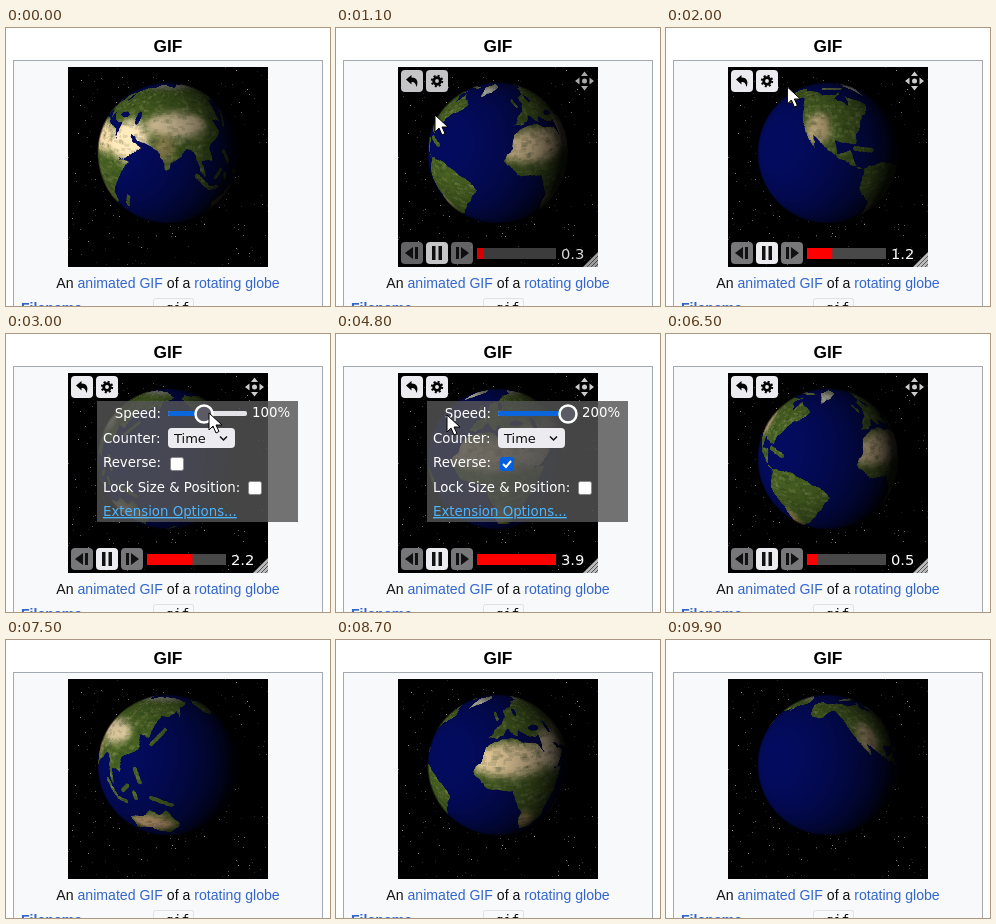
An HTML page with a canvas that plays this animation: 324 px wide and 278 px high, repeating every 10000 ms.

```html
<!DOCTYPE html>
<html lang="en">
<head>
<meta charset="utf-8">
<title>Rotating globe</title>
<style>
html, body { margin: 0; width: 324px; height: 278px; overflow: hidden; background: #fff; }
body { position: relative; }
#box { position: absolute; left: 7px; top: 32px; width: 308px; height: 260px; border: 1px solid #a2a9b1; background: #f8f9fa; }
canvas { position: absolute; left: 62px; top: 39px; }
svg { position: absolute; left: 0; top: 0; }
.page { font: 14.1px "Liberation Sans", Arial, sans-serif; }
.ui { font: 13.33px "DejaVu Sans", Verdana, sans-serif; fill: #fff; }
.link { fill: #36c; }
</style>
</head>
<body>
<div id="box"></div>
<canvas id="globe" width="200" height="200"></canvas>
<svg width="324" height="278">
  <g class="page">
    <text x="162" y="23.500" text-anchor="middle" font-size="17.3" font-weight="bold">GIF</text>
    <text x="162" y="260" text-anchor="middle" fill="#111">An <tspan class="link">animated GIF</tspan> of a <tspan class="link">rotating globe</tspan></text>
    <text x="15" y="285" font-weight="bold" class="link">Filename</text>
    <rect x="147.500" y="270.500" width="40" height="20" rx="2" fill="#f8f9fa" stroke="#dfe1e5"/>
    <text x="152" y="284" font-size="13" font-family="DejaVu Sans Mono, monospace">.gif</text>
  </g>
  <g id="controls">
    <g fill="#ececf0">
      <rect x="65" y="42" width="22" height="22" rx="4"/>
      <rect x="90" y="42" width="22" height="22" rx="4"/>
      <rect x="90" y="214" width="22" height="22" rx="4"/>
    </g>
    <g fill="#77777a">
      <rect x="65" y="214" width="22" height="22" rx="4"/>
      <rect x="115" y="214" width="22" height="22" rx="4"/>
    </g>
    <path d="M70 51.500l5.500-4.500v2.500c6 0 7 5 5 9.500c-1-4-2-5-5-5v2.500z"/>
    <g fill="none" stroke="#000">
      <circle cx="101" cy="53" r="3.300" stroke-width="2.800"/>
      <circle cx="101" cy="53" r="5.200" stroke-width="2" stroke-dasharray="2.040"/>
    </g>
    <path d="M69 225l8-6v12zM79 219h3v12h-3zM96 218h3.500v14H96zM102.500 218h3.500v14h-3.500zM120 219h3v12h-3zM133 225l-8-6v12z" fill="#111"/>
    <rect x="141" y="220" width="79" height="11" fill="#484848"/>
    <rect id="bar" x="141" y="220" height="11" fill="#f00"/>
    <text id="count" class="ui" x="225" y="231" style="font-size:14.7px"></text>
    <path d="M248.500 43.500l3.500 4.500h-7zM248.500 62.500l3.500-4.500h-7zM239 53l4.500-3.500v7zM258 53l-4.500-3.500v7z" fill="#ccc"/>
    <circle cx="248.500" cy="53" r="2.500" fill="#ccc"/>
    <path d="M262 224v15h-15z" fill="#bbb"/>
    <path d="M251 239l11-11M255 239l7-7M259 239l3-3" stroke="#555"/>
  </g>
  <g id="panel" class="ui">
    <rect x="91" y="67" width="201" height="121" fill="#555" fill-opacity=".82"/>
    <text x="155" y="84" text-anchor="end">Speed:</text>
    <text x="97" y="109">Counter:</text>
    <text x="97" y="133">Reverse:</text>
    <text x="97" y="158">Lock Size &amp; Position:</text>
    <text x="97" y="182" fill="#4db5ff" text-decoration="underline">Extension Options...</text>
    <rect x="162" y="77" width="79" height="5" rx="2" fill="#e4e4e8"/>
    <rect id="fill" x="162" y="77" height="5" rx="2" fill="#0b66dc"/>
    <circle id="thumb" cy="80" r="8.500" fill="#5b5b66" stroke="#fff" stroke-width="2.500"/>
    <text id="percent" x="246" y="83"></text>
    <rect x="162" y="94" width="67" height="20" rx="4" fill="#ececf0"/>
    <text x="168" y="109" fill="#111" style="font-size:13px">Time</text>
    <path d="M214 102.500l3.500 3.500l3.500-3.500" fill="none" stroke="#111" stroke-width="1.500"/>
    <rect x="164.500" y="123.500" width="13" height="13" rx="2" fill="#fff" stroke="#888"/>
    <rect x="242.500" y="147.500" width="13" height="13" rx="2" fill="#fff" stroke="#888"/>
    <g id="check">
      <rect x="164" y="123" width="14" height="14" rx="2" fill="#0060df"/>
      <path d="M167 130l3 3l5-6" fill="none" stroke="#fff" stroke-width="2"/>
    </g>
  </g>
  <path id="cursor" d="M0 0v17l4-4l3 7l3-1.500l-3-6.500h6z" fill="#fff" stroke="#000"/>
</svg>
<script>
const $ = id => document.getElementById(id);
const clamp = (v, lo = 0, hi = 1) => Math.min(hi, Math.max(lo, v));
const ramp = (t, a, b) => clamp((t - a) / (b - a));
const mod = (v, n) => (v % n + n) % n;
let seed = 7;
const rand = () => (seed = seed * 16807 % 2147483647) / 2147483647;

// Key capes and bays as longitude, latitude; the coast between them is roughened
const continents = {
  africa: "-17 15 -9 31 10 37 32 31 43 12 51 12 40 -5 35 -24 27 -34 18 -34 9 3 -8 5",
  eurasia: "-9 37 -2 44 8 54 6 60 27 71 104 77 179 68 160 61 157 52 155 59 136 54 128 37 119 39 122 30 108 21 109 12 101 13 103 2 97 17 91 22 80 14 77 8 72 20 58 26 49 30 52 25 59 22 45 13 35 29 36 37 27 37 18 43 16 38 9 44 -1 37",
  australia: "114 -22 131 -12 137 -16 142 -11 153 -27 147 -38 131 -31 116 -35",
  greenland: "-45 60 -58 76 -35 83 -20 76",
  northAmerica: "-168 66 -156 71 -82 68 -94 60 -79 52 -77 62 -56 52 -70 43 -81 31 -81 25 -97 28 -96 19 -87 21 -83 9 -78 8 -95 16 -113 31 -111 23 -124 41 -135 59 -165 55",
  southAmerica: "-78 8 -60 9 -35 -6 -48 -27 -66 -45 -68 -55 -75 -48 -71 -19 -81 -5"
};
// Islands are thick strokes from end to end
const islands = "131 33 141 43 97 4 105 -5 112 0 116 4 107 -7 114 -8 121 0 122 -4 133 -2 146 -7 121 16 125 8 175 -39 168 -45 -4 57 -1 52 49 -14 45 -24 -83 22 -70 19 -115 72 -70 72";
const W = 720, H = 360;
const points = s => s.match(/\S+ \S+/g).map(p => p.split(" ")).map(([lon, lat]) => [(+lon + 180) * 2, (90 - lat) * 2]);

function roughen([x1, y1], [x2, y2], depth, path) {
  if (!depth) return path.lineTo(x2, y2);
  const k = (rand() - .5) * .25;
  const mid = [(x1 + x2) / 2 + (y2 - y1) * k, (y1 + y2) / 2 - (x2 - x1) * k];
  roughen([x1, y1], mid, depth - 1, path);
  roughen(mid, [x2, y2], depth - 1, path);
}

function makeMap() {
  const c = document.createElement("canvas");
  c.width = W; c.height = H;
  const g = c.getContext("2d");
  const spot = (lon, lat, rx, ry, color) => {
    g.fillStyle = color;
    g.beginPath();
    g.ellipse((lon + 180) * 2, (90 - lat) * 2, rx * 2, ry * 2, 0, 0, 7);
    g.fill();
  };
  g.fillStyle = g.strokeStyle = "#42591f";
  g.lineWidth = 6;
  g.lineCap = "round";
  g.filter = "blur(0.7px)";
  for (const outline of Object.values(continents)) {
    const p = points(outline), path = new Path2D();
    p.forEach((a, i) => roughen(a, p[(i + 1) % p.length], 3, path));
    g.fill(path);
  }
  g.beginPath();
  points(islands).forEach((p, i) => g[i % 2 ? "lineTo" : "moveTo"](...p));
  g.stroke();

  g.globalCompositeOperation = "destination-out";
  spot(34, 43, 6, 2.2);   // Black Sea
  spot(51, 42, 2.5, 5);   // Caspian
  spot(20, 58, 2.5, 4);   // Baltic

  g.globalCompositeOperation = "source-atop";
  g.filter = "blur(6px)";
  spot(10, 23, 30, 11, "#e6cb9c");   // Sahara
  spot(47, 26, 17, 14, "#eed7ae");   // Arabia, Iran
  spot(85, 38, 26, 9, "#c9b690");    // Tibet
  spot(75, 23, 7, 8, "#85794a");     // India
  spot(20, -24, 8, 9, "#b39a64");    // Kalahari
  spot(132, -25, 17, 8, "#d3a97c");  // Outback
  spot(-110, 36, 10, 11, "#a8946c"); // Rockies
  spot(-67, -38, 5, 16, "#a8905e");  // Patagonia
  spot(-42, 74, 18, 13, "#cfccc4");  // Greenland ice
  g.fillStyle = "#8b8b7c";
  g.fillRect(0, 0, W, 36);
  g.filter = "none";
  for (let i = 0; i < 7000; i++) {
    g.fillStyle = rand() < .6 ? "#1a300c22" : "#e8d8a81c";
    g.fillRect(rand() * W, rand() * H, 3 + rand() * 8, 2 + rand() * 4);
  }
  g.globalCompositeOperation = "destination-over";
  g.fillStyle = "#030a55";
  g.fillRect(0, 0, W, H);
  return g.getImageData(0, 0, W, H).data;
}

// Each visible pixel's map row, longitude offset and light, seen in perspective
function makeSphere() {
  const R = 71, D = 4, q = D * D - 1, tilt = 20 * Math.PI / 180, pixels = [];
  for (let j = 0; j < 200; j++) for (let i = 0; i < 200; i++) {
    const u = (i - 99.5) / R, v = (85.5 - j) / R, r = Math.hypot(u, v);
    if (r > 1) continue;
    const sx = u / Math.sqrt(q), sy = v / Math.sqrt(q), m = sx * sx + sy * sy + 1;
    const k = (D - Math.sqrt(Math.max(0, D * D - m * q))) / m;
    const x = k * sx, y = k * sy, z = D - k;
    const north = y * Math.cos(tilt) + z * Math.sin(tilt);
    const front = z * Math.cos(tilt) - y * Math.sin(tilt);
    const lat = Math.asin(clamp(north, -1, 1)) * 180 / Math.PI;
    pixels.push({
      at: (j * 200 + i) * 4,
      row: clamp(Math.floor((90 - lat) * 2), 0, H - 1) * W,
      lon: Math.atan2(x, front) * 180 / Math.PI,
      light: clamp(.08 + 1.05 * (-.6 * x + .1 * y + .79 * z), .08, 1.1) * clamp((1 - r) * R / 2)
    });
  }
  return pixels;
}

const map = makeMap(), sphere = makeSphere();
const ctx = $("globe").getContext("2d");
ctx.fillRect(0, 0, 200, 200);
for (let i = 0; i < 300; i++) {
  const b = 35 + rand() ** 3 * 130;
  ctx.fillStyle = `rgb(${b},${b * .9},${b * .8})`;
  ctx.fillRect(Math.floor(rand() * 200), Math.floor(rand() * 200), 1, 1);
}
const picture = ctx.getImageData(0, 0, 200, 200);

function drawGlobe(center) {
  for (const { at, row, lon, light } of sphere) {
    const col = Math.floor(mod(lon + center + 180, 360) * 2) % W;
    for (let k = 0; k < 3; k++) picture.data[at + k] = map[(row + col) * 4 + k] * light;
  }
  ctx.putImageData(picture, 0, 0);
}

const REVERSE = 4.48;
const forward = t => 3.25 + t + clamp(t - 3.4, 0, .5) ** 2 + Math.max(t - 3.9, 0);
// Playback position within the 4 s clip
const position = t => mod(t < REVERSE ? forward(t) : forward(REVERSE) - 2 * (t - REVERSE), 4);

// Pointer stops: time, x, y
const stops = [
  [.2, 40, 285], [1.1, 99, 87], [1.8, 101, 54], [2.8, 203, 79], [3.4, 203, 79],
  [3.9, 237, 79], [4.4, 170, 128], [4.8, 111, 81], [5.3, 101, 52], [6.1, 120, -25]
];
function pointer(t) {
  const i = stops.findIndex(s => s[0] >= t);
  if (i < 1) return [-50, -50];
  const [a, x, y] = stops[i - 1], [b, x2, y2] = stops[i], f = ramp(t, a, b);
  return [x + (x2 - x) * f, y + (y2 - y) * f];
}

let last = -1;
function draw(now) {
  requestAnimationFrame(draw);
  const step = Math.floor(now % 10000 / 100);
  if (step === last) return;
  last = step;
  const t = step / 10, p = position(t), speed = 1 + ramp(t, 3.4, 3.9), thumb = 198 + 34 * (speed - 1);
  drawGlobe(10.5 - 90 * p);
  $("controls").style.opacity = ramp(t, .6, 1.2) - ramp(t, 6.9, 7.2);
  $("panel").style.opacity = ramp(t, 2, 2.3) - ramp(t, 5.3, 5.6);
  $("bar").setAttribute("width", 79 * Math.min(1, p / 3.9));
  $("count").textContent = (Math.floor(p * 10 + 1e-6) / 10).toFixed(1);
  $("fill").setAttribute("width", thumb - 162);
  $("thumb").setAttribute("cx", thumb);
  $("percent").textContent = Math.round(speed * 100) + "%";
  $("check").style.display = t > REVERSE ? "" : "none";
  $("cursor").setAttribute("transform", `translate(${pointer(t)})`);
}
requestAnimationFrame(draw);
</script>
</body>
</html>
```
